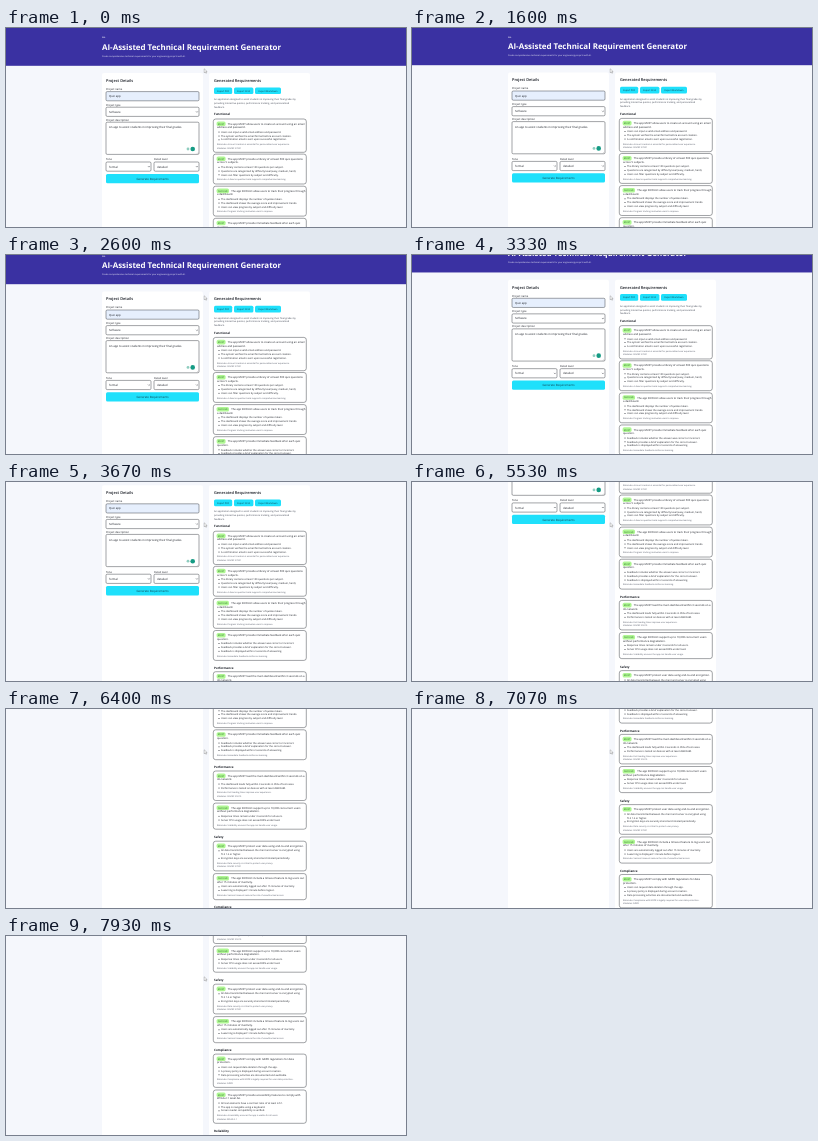
Animation of 400x199 px, one loop 8000 ms. Source, as an HTML page:

```html
<!DOCTYPE html>
<html lang="en">
<head>
<meta charset="utf-8">
<title>Requirement Generator</title>
<style>
html, body { margin: 0; width: 100%; height: 100%; overflow: hidden; background: #f5f7fc; }
svg { display: block; width: 400px; height: 199px; }
text { font-family: "Open Sans", "Noto Sans", sans-serif; text-rendering: geometricPrecision; white-space: pre; }
</style>
</head>
<body>
<svg viewBox="0 0 400 199">
  <g id="page"></g>
  <path d="M198.2 40.8v4l1-.9.7 1.4.7-.3-.7-1.4h1.3z" fill="#fff" stroke="#555" stroke-width=".3"/>
</svg>
<script>
const page = document.getElementById('page');
const CYAN = '#1fe0fb', INK = '#161a22', LINE = '#30343c';
const parts = [];

// y is the vertical middle of the line
const text = (x, y, size, str, { weight = 400, fill = INK, anchor = 'start' } = {}) =>
  parts.push(`<text x="${x}" y="${y + size * .36}" font-size="${size}" font-weight="${weight}" fill="${fill}" text-anchor="${anchor}">${str}</text>`);
const rect = (x, y, w, h, r, fill, stroke = 'none') =>
  parts.push(`<rect x="${x}" y="${y}" width="${w}" height="${h}" rx="${r}" fill="${fill}" stroke="${stroke}" stroke-width=".45"/>`);
const path = (d, stroke, width) =>
  parts.push(`<path d="${d}" fill="none" stroke="${stroke}" stroke-width="${width}"/>`);
const dot = (x, y, r, fill) => parts.push(`<circle cx="${x}" cy="${y}" r="${r}" fill="${fill}"/>`);

function field(x, y, w, h, label, value, { fill = '#fff', select = false } = {}) {
  text(x, y - 2.6, 2.65, label, { weight: 500 });
  rect(x, y, w, h, 1.2, fill, LINE);
  text(x + 3, y + Math.min(h / 2, 5.2), 2.8, value);
  if (select) path(`M${x + w - 3} ${y + h / 2 - .4}l.9.9.9-.9`, INK, .45);
}

function button(x, y, w, h, size, label) {
  rect(x, y, w, h, 1.5, CYAN);
  text(x + w / 2, y + h / 2, size, label, { weight: 500, fill: '#123b4a', anchor: 'middle' });
}

// y is the middle of the badge line; a bullet starting with ">" continues the one above
function requirement(y, level, title, bullets, notes) {
  const top = y - 4.7, at = parts.length;
  const badge = level === 'MUST' ? 9 : 12.4;
  rect(210.6, y - 2.3, badge, 4.6, 1.6, '#b0f794');
  text(210.6 + badge / 2, y, 2.4, level, { weight: 500, fill: '#236b22', anchor: 'middle' });
  title.forEach((line, i) => text(i ? 211 : 212.8 + badge, y + i * 3.6, 2.65, line, { weight: 500 }));
  y += (title.length - 1) * 3.6 + 4.7;
  bullets.forEach((line, i) => {
    if (i) y += 3.8;
    const more = line[0] === '>';
    if (!more) dot(213, y + .1, .5, INK);
    text(215, y, 2.48, more ? line.slice(1) : line);
  });
  y += 4.9;
  notes.forEach((line, i) => text(211, y + i * 3.4, 2.15, line, { fill: '#4b5160' }));
  const bottom = y + (notes.length - 1) * 3.4 + 4.4;
  rect(207.3, top, 93, bottom - top, 2.4, '#fff', LINE);
  parts.splice(at, 0, parts.pop()); // the box goes behind its contents
}

const heading = (y, str) => text(208, y, 3, str, { weight: 700 });

// Header
rect(0, -2, 400, 39.8, 0, '#3a31a2');
text(96, 9.6, 1.9, 'PBL', { weight: 600, fill: '#fff' });
text(96, 18.8, 7.95, 'AI-Assisted Technical Requirement Generator', { weight: 700, fill: '#fff' });
text(96, 27.8, 2.15, 'Create comprehensive technical requirements for your engineering projects with AI.', { weight: 500, fill: '#fff' });

// Form
rect(96, 45, 101, 500, 2, '#fff');
rect(203, 45, 101, 500, 2, '#fff');
text(100, 52.6, 3.9, 'Project Details', { weight: 600 });
field(100, 63.6, 93, 9.2, 'Project name', 'Quiz app', { fill: '#e6effd' });
field(100, 79.2, 93, 9.2, 'Project type', 'Software', { select: true });
field(100, 94.2, 93, 32.2, 'Project description', 'An app to assist students in improving their final grades.');
dot(182, 121, 1.4, '#8fcdbf');
dot(186.7, 121, 2.3, '#159b84');
path('M192.3 124.4l-1.5 1.5M192.4 125.4l-.6.6', '#777', .25);
field(100, 134, 45, 9.2, 'Tone', 'formal', { select: true });
field(148, 134, 45, 9.2, 'Detail level', 'detailed', { select: true });
button(100, 145.9, 93, 9.3, 2.9, 'Generate Requirements');

// Results
text(208, 52.6, 3.9, 'Generated Requirements', { weight: 600 });
button(208, 59.4, 18.2, 6.6, 2.3, 'Export PDF');
button(228, 59.4, 19.4, 6.6, 2.3, 'Export XLSX');
button(249, 59.4, 26, 6.6, 2.3, 'Export Markdown');
['An application designed to assist students in improving their final grades by',
 'providing interactive quizzes, performance tracking, and personalized',
 'feedback.'].forEach((line, i) => text(208, 71.4 + i * 3.65, 2.35, line, { fill: '#3c4250' }));

heading(86.2, 'Functional');
requirement(95.7, 'MUST',
  ['The app MUST allow users to create an account using an email', 'address and password.'],
  ['Users can input a valid email address and password.',
   'The system verifies the email format before account creation.',
   'A confirmation email is sent upon successful registration.'],
  ['Rationale: Account creation is essential for personalized user experience.', 'Validates: ISO/IEC 27001']);
requirement(130.8, 'MUST',
  ['The app MUST provide a library of at least 500 quiz questions', 'across 5 subjects.'],
  ['The library contains at least 100 questions per subject.',
   'Questions are categorized by difficulty level (easy, medium, hard).',
   'Users can filter questions by subject and difficulty.'],
  ['Rationale: A diverse question bank supports comprehensive learning.']);
requirement(162.9, 'SHOULD',
  ['The app SHOULD allow users to track their progress through', 'a dashboard.'],
  ['The dashboard displays the number of quizzes taken.',
   'The dashboard shows the average score and improvement trends.',
   'Users can view progress by subject and difficulty level.'],
  ['Rationale: Progress tracking motivates users to improve.']);
requirement(195, 'MUST',
  ['The app MUST provide immediate feedback after each quiz', 'question.'],
  ['Feedback includes whether the answer was correct or incorrect.',
   'Feedback provides a brief explanation for the correct answer.',
   'Feedback is displayed within 2 seconds of answering.'],
  ['Rationale: Immediate feedback reinforces learning.']);

heading(227.8, 'Performance');
requirement(236.2, 'MUST',
  ['The app MUST load the main dashboard within 3 seconds on a', '4G network.'],
  ['The dashboard loads fully within 3 seconds in 95% of test cases.',
   'Performance is tested on devices with at least 2GB RAM.'],
  ['Rationale: Fast loading times improve user experience.', 'Validates: ISO/IEC 25010']);
requirement(268.3, 'SHOULD',
  ['The app SHOULD support up to 10,000 concurrent users', 'without performance degradation.'],
  ['Response times remain under 3 seconds for all users.',
   'Server CPU usage does not exceed 80% under load.'],
  ['Rationale: Scalability ensures the app can handle user usage.']);

heading(297.8, 'Safety');
requirement(306.4, 'MUST',
  ['The app MUST protect user data using end-to-end encryption.'],
  ['All data transmitted between the client and server is encrypted using',
   '>TLS 1.2 or higher.',
   'Encryption keys are securely stored and rotated periodically.'],
  ['Rationale: Data security is critical to protect user privacy.', 'Validates: ISO/IEC 27001']);
requirement(338.8, 'SHOULD',
  ['The app SHOULD include a timeout feature to log users out', 'after 15 minutes of inactivity.'],
  ['Users are automatically logged out after 15 minutes of inactivity.',
   'A warning is displayed 1 minute before logout.'],
  ['Rationale: Session timeouts reduce the risk of unauthorized access.']);

heading(367.8, 'Compliance');
requirement(376.3, 'MUST',
  ['The app MUST comply with GDPR regulations for data', 'protection.'],
  ['Users can request data deletion through the app.',
   'A privacy policy is displayed during account creation.',
   'Data processing activities are documented and auditable.'],
  ['Rationale: Compliance with GDPR is legally required for user data protection.', 'Validates: GDPR']);
requirement(412.2, 'MUST',
  ['The app MUST provide accessibility features to comply with', 'WCAG 2.1 Level AA.'],
  ['All text elements have a contrast ratio of at least 4.5:1.',
   'The app is navigable using a keyboard.',
   'Screen reader compatibility is verified.'],
  ['Rationale: Accessibility ensures the app is usable for all users.', 'Validates: WCAG 2.1']);
heading(448.6, 'Reliability');

page.innerHTML = parts.join('');

// [time in ms, scroll offset]
const stops = [[0, 0], [1533, 0], [1600, .6], [2600, 8.6], [2930, 16], [3266, 16], [3670, 42],
  [4070, 58], [4200, 58], [4600, 74], [4933, 74], [6400, 169.5], [7930, 253.5], [8000, 253.5]];

function scrollAt(t) {
  const i = stops.findIndex(s => s[0] > t);
  const [t0, y0] = stops[i - 1], [t1, y1] = stops[i];
  return y0 + (y1 - y0) * (t - t0) / (t1 - t0);
}

function draw(now) {
  const t = Math.floor(now % 8000 * .015 + .05) / .015 % 8000; // 15 steps a second
  page.setAttribute('transform', `translate(0 ${-scrollAt(t)})`);
  requestAnimationFrame(draw);
}
draw(0);
</script>
</body>
</html>
```
